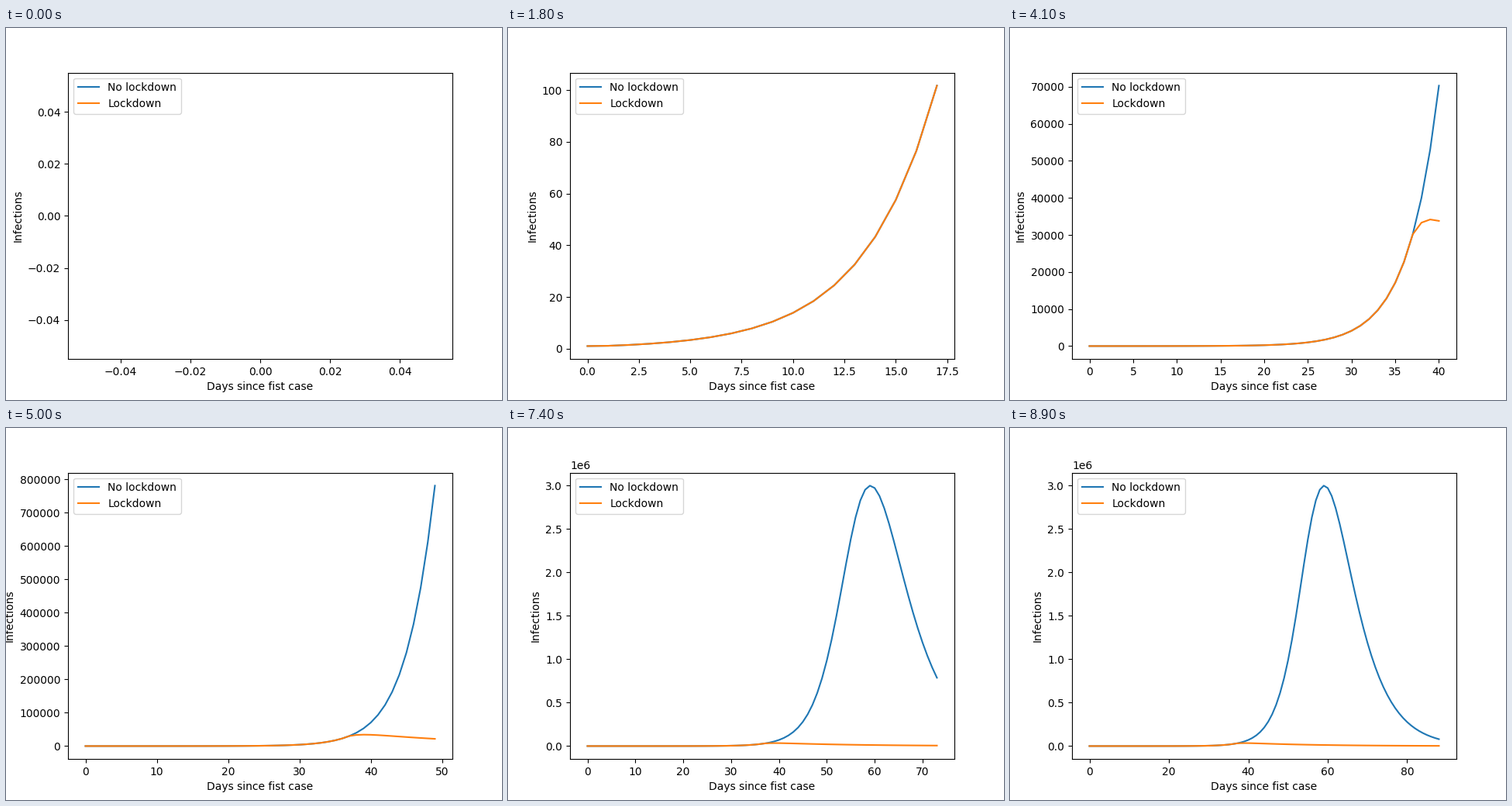
A matplotlib script for the animation above (9 s loop, 640 px wide and 480 px high).

```python
import numpy as np
import matplotlib.pyplot as plt
from matplotlib.animation import FuncAnimation

FRAMES = 90
INTERVAL = 100

POPULATION = 9.62e6
CONTACT = 0.987          # infections caused per infectious person and day
CONTACT_LOCKED = 0.095
LOCKDOWN_DAY = 36
INCUBATION = 3           # mean days before becoming infectious
RECOVERY = 6             # mean days until recovered
MIXING = 1.33            # above 1: the most exposed people are infected first


def simulate(lockdown_day=None):
    """Infectious people per day in a daily SEIR model."""
    exposed, infectious = 0.8, 1.0
    susceptible = POPULATION - exposed - infectious
    history = []
    for day in range(FRAMES):
        history.append(infectious)
        locked = lockdown_day is not None and day >= lockdown_day
        contact = CONTACT_LOCKED if locked else CONTACT
        infected = contact * infectious * (susceptible / POPULATION) ** MIXING
        onset = exposed / INCUBATION
        susceptible -= infected
        exposed += infected - onset
        infectious += onset - infectious / RECOVERY
    return np.array(history)


days = np.arange(FRAMES)
curves = [simulate(), simulate(LOCKDOWN_DAY)]

fig, ax = plt.subplots(figsize=(6.4, 4.8), dpi=100)
lines = [ax.plot([], [], label=name)[0] for name in ("No lockdown", "Lockdown")]
ax.set_xlabel("Days since fist case")
ax.set_ylabel("Infections")
ax.legend(loc="upper left")


def update(n):
    for line, curve in zip(lines, curves):
        line.set_data(days[:n], curve[:n])
    ax.relim()
    ax.autoscale_view()
    return lines


anim = FuncAnimation(fig, update, frames=FRAMES, interval=INTERVAL,
                     repeat=True, repeat_delay=0, blit=False)
plt.show()
```
